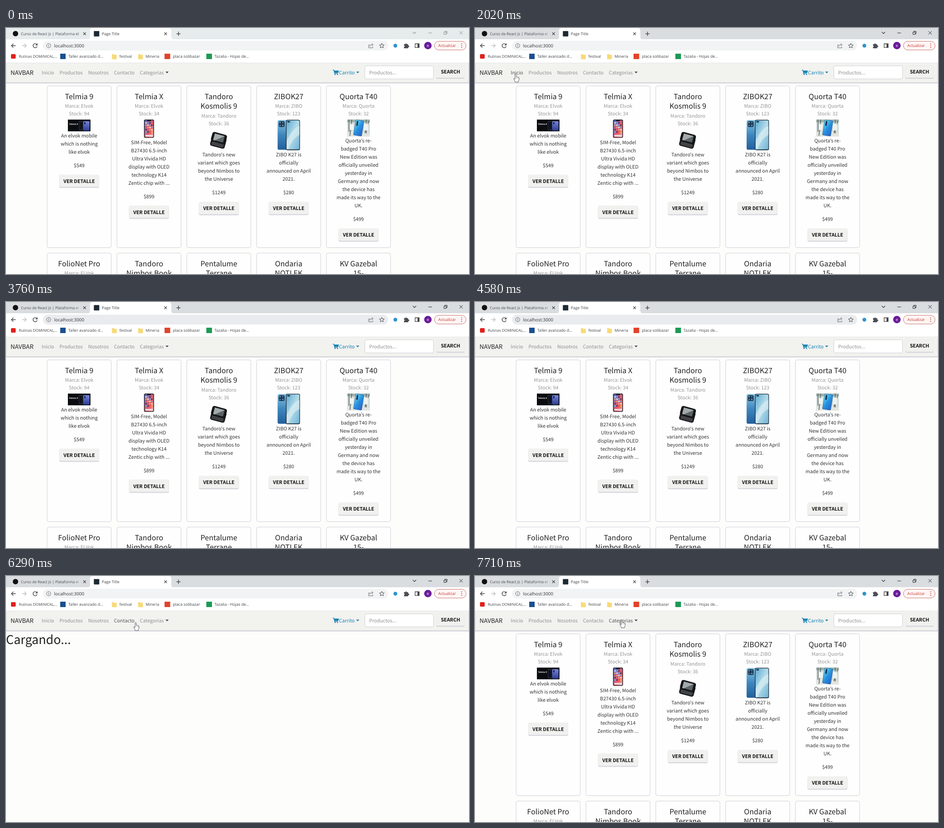
An HTML page that plays this animation: 1025 by 546 pixels, repeating every 8 s.

```html
<!DOCTYPE html>
<html lang="es">
<head>
<meta charset="utf-8">
<title>Page Title</title>
<style>
html, body { margin: 0; width: 100%; height: 100%; overflow: hidden; background: #fdfdfc; }
svg { display: block; width: 1025px; height: 546px; }
text { white-space: pre; text-rendering: geometricPrecision; }
.web { font-family: "Noto Sans CJK JP", "Noto Sans CJK SC", "Noto Sans CJK", sans-serif; }
.ui { font-family: "Open Sans", "Noto Sans", sans-serif; }
</style>
</head>
<body>
<svg id="stage" viewBox="0 0 1025 546" xmlns="http://www.w3.org/2000/svg"></svg>
<script>
const LOOP = 8000;
const RELOAD = 4620, LISTED = 6830, IMAGES = 7380, LAST_IMAGE = 7710;
const EM = 0.896; // the Latin glyphs of the CJK face are drawn larger than usual

// --- drawing helpers ---
const web = (x, y, s, size = 12, fill = '#333', more = '') =>
  `<text class="web" x="${x}" y="${y}" font-size="${size * EM}" fill="${fill}" ${more}>${s}</text>`;
const mid = (x, y, s, size, fill, more = '') =>
  web(x, y, s, size, fill, 'text-anchor="middle" ' + more);
const ui = (x, y, s, size = 8.7, fill = '#3c4043', more = '') =>
  `<text class="ui" x="${x}" y="${y}" font-size="${size}" fill="${fill}" ${more}>${s}</text>`;
const box = (x, y, w, h, fill, r = 0, more = '') =>
  `<rect x="${x}" y="${y}" width="${w}" height="${h}" rx="${r}" fill="${fill}" ${more}/>`;
const dot = (x, y, r, fill, more = '') =>
  `<circle cx="${x}" cy="${y}" r="${r}" fill="${fill}" ${more}/>`;
const line = (d, stroke, w = 1.2, more = '') =>
  `<path d="${d}" fill="none" stroke="${stroke}" stroke-width="${w}" ${more}/>`;
const shape = (d, fill, more = '') => `<path d="${d}" fill="${fill}" ${more}/>`;
const group = (id, body, more = '') => `<g id="${id}" ${more}>${body}</g>`;
const grad = (id, x2, y2, ...colors) =>
  `<linearGradient id="${id}" x2="${x2}" y2="${y2}">` + colors.map((c, i) =>
    `<stop offset="${i / (colors.length - 1)}" stop-color="${c}"/>`).join('') + '</linearGradient>';

function button(x, y, w, h, label) {
  return box(x, y + 1.5, w, h, '#cfcfd8', 3) +
    box(x, y, w, h - .5, '#f1f1f0', 3, 'stroke="#e6e6e6" stroke-width=".6"') +
    mid(x + w / 2, y + h / 2 + 4.2, label, 12, '#111', 'font-weight="700"');
}

// --- product pictures, around x = 0 from the top y = 0 ---
const pictures = [
  () => box(-25, 0, 50, 26, '#0b0c10') +
    ui(-22.5, 12, 'Telmia 9', 4.8, '#f4f4f6', 'font-weight="700"') +
    box(-1, 3.5, 10, 20, '#2a2f45', 1.5) + box(0, 5, 8, 17, '#10131f', 1) +
    box(9, 3.5, 14, 21, 'url(#navy)', 2) + box(11, 5.5, 3, 5, '#1b2148', 1),
  () => box(-11, 0, 22, 40.5, '#17171d', 3) + box(-9.6, 1.4, 19.2, 37.7, 'url(#candy)', 2.2) +
    box(-4.5, 1, 9, 2.4, '#17171d', 1.2) +
    [0, 1, 2, 3, 4].map(r => [0, 1, 2, 3].map(c =>
      box(-8 + c * 4.3, 6 + r * 5, 2.9, 2.9, ['#f6f6f8', '#f0545c', '#4db4ea', '#f5b34a', '#2d3350'][(r * 3 + c * 2) % 5], .8)
    ).join('')).join('') + box(-8, 34, 16, 3.6, '#e9dbe6', 1),
  () => '<g transform="translate(-.6 24) rotate(15) scale(.9)">' +
    box(-18, -9, 37, 27, '#1b1c1e', 5) + box(-15, 7, 31, 8.5, '#303234', 2) +
    [0, 1, 2].map(r => line(`M-13 ${8.6 + r * 2.6}H15`, '#85878a', .9, 'stroke-dasharray="1.5 1.3"')).join('') +
    box(-19, -17, 37, 23, '#141517', 5) + box(-13, -13.5, 25, 16.5, '#5d6468', 1) +
    shape('M-13 -13.5H12L-9 3H-13Z', '#a3aaac') + '</g>',
  () => box(-24.5, 1, 23, 66, 'url(#sea)', 3.5) + box(-22, 3.5, 13, 13, '#173753', 3) +
    dot(-19, 6.8, 1.8, '#7894ab') + dot(-13, 6.8, 1.8, '#60798f') +
    dot(-19, 13, 1.8, '#60798f') + dot(-13, 13, 1.8, '#7894ab') +
    box(-6, .5, 31, 67.5, '#16212f', 3.5) + box(-4.8, 1.7, 28.6, 64.5, 'url(#sky)', 2.6) +
    shape('M-4.8 48Q8 20 23.8 14V34Q8 42 -1 66H-4.8Z', '#e3f2f5', 'opacity=".6"') +
    box(-3, 3.5, 6, 2.8, '#16212f', 1.4),
  () => box(-25, 0, 50, 37.5, '#d3dcdb') + box(-25, 0, 50, 6, '#9fb0ac') +
    shape('M-25 29L-9 23L25 31V37.5H-25Z', '#e4e5df') +
    line('M-21 0V27M-15 0L-19 36M17 0V31M23 3L14 30', '#53635f', 1.5) +
    box(-19, 10, 8, 13, '#f0f4f1') + box(12, 9, 9, 15, '#eef2f0') +
    '<g transform="translate(0 18) rotate(9)">' + box(-9, -17, 19, 35, '#1c62a8', 2.5) +
    box(-8.2, -16.2, 17.4, 33.4, 'url(#aqua)', 2) + box(-6, -14.5, 3.4, 11, '#143150', 1.5) + '</g>'
];
const heights = [26, 40.8, 47, 68.5, 37.5];

// --- products: title, brand, stock, text, price ---
const rows = [[
  ['Telmia 9', 'Elvok', 94, 'An elvok mobile|which is nothing|like elvok', 549],
  ['Telmia X', 'Elvok', 34, 'SIM-Free, Model|B27430 6.5-inch|Ultra Vivida HD|display with OLED|technology K14|Zentic chip with ...', 899],
  ['Tandoro|Kosmolis 9', 'Tandoro', 36, 'Tandoro\'s new|variant which goes|beyond Nimbos to|the Universe', 1249],
  ['ZIBOK27', 'ZIBO', 123, 'ZIBO K27 is|officially|announced on April|2021.', 280],
  ['Quorta T40', 'Quorta', 32, 'Quorta’s re-|badged T40 Pro|New Edition was|officially unveiled|yesterday in|Germany and now|the device has|made its way to the|UK.', 499]
], [
  ['FolioNet Pro', 'ELVok', 83],
  ['Tandoro|Nimbos Book', 'Tandoro', 50],
  ['Pentalume|Terrane|Laptop 4', 'Pentalume', 68],
  ['Ondaria|NOTLEK', 'Ondaria', 96],
  ['KV Gazebal|15-|RT2048LN', 'KV Gazebal', 89]
]];

function card(item, col, top, height, loaded) {
  const [title, brand, stock, text, price] = item;
  const x = 162 + col * 154.6;
  let out = box(x - 71, top, 142, height, '#fefefe', 4, 'stroke="#cfcfd8" stroke-width="1"');
  let y = top + 29.3;
  title.split('|').forEach((s, i) => {
    if (i) y += 21.6;
    out += mid(x, y, s, 18, '#222');
  });
  out += mid(x, y + 19.2, 'Marca: ' + brand, 12, '#969696') +
    mid(x, y + 36.4, 'Stock: ' + stock, 12, '#969696');
  if (!text) return out;
  y += 45.5;
  if (loaded) {
    const clip = col === 3 ? 'clip-path="url(#partial)"' : '';
    out += `<g ${clip}><g transform="translate(${x} ${y})">${pictures[col]()}</g></g>`;
  }
  y += (loaded ? heights[col] : 18) - 4.5;
  for (const s of text.split('|')) out += mid(x, y += 18, s, 12, '#333');
  y += 30;
  return out + mid(x, y, '$' + price, 12, '#333') + button(x - 44, y + 17, 88, 27.5, 'VER DETALLE');
}

function grid(loaded) {
  const h = loaded ? 359 : 339.3;
  return rows[0].map((p, i) => card(p, i, 128.5, h, loaded)).join('') +
    rows[1].map((p, i) => card(p, i, 140.5 + h, 359, loaded)).join('');
}

// --- navbar ---
const links = [['Inicio', 79, 106], ['Productos', 118.5, 170], ['Nosotros', 182, 227],
  ['Contacto', 239, 285], ['Categorias', 296.3, 350]];
const caret = (x, fill) => shape(`M${x} 96.8h7.2l-3.6 3.8z`, fill);

function navbar() {
  return box(0, 121, 1025, 2, '#cfcfdb') +
    box(.5, 77, 1024, 44, '#f2f2ef', 0, 'stroke="#dcdcdc"') +
    web(10, 103.6, 'NAVBAR', 15, '#222') +
    links.map(([s, x], i) => web(x, 102.8, s, 12, '#8f8f8f', `id="link${i}"`)).join('') +
    caret(353, '#444') +
    line('M723.5 93.5h2.3l1.8 7.6h7', '#1482b4', 1.3) +
    shape('M726 94.5h11l-1.5 5.3h-8.2z', '#1482b4') +
    dot(728.5, 103, 1.3, '#1482b4') + dot(734, 103, 1.3, '#1482b4') +
    web(737.2, 102.8, 'Carrito', 12, '#1482b4') + caret(775, '#1482b4') +
    box(794.5, 84, 152, 29, '#fff', 3.5, 'stroke="#cfcfd4"') +
    web(804, 102.8, 'Productos...', 12, '#8f8f8f') +
    button(953, 83.5, 62, 27.5, 'SEARCH');
}

// --- browser frame ---
const cross = (x, y, r, color, w) =>
  line(`M${x - r} ${y - r}l${2 * r} ${2 * r}M${x + r} ${y - r}l${-2 * r} ${2 * r}`, color, w);
const folder = x => shape(`M${x} 58h4l1.4 1.6h5.2v9.6h-10.6z`, '#f8d978');

function browser() {
  const ink = '#5f6368';
  return box(0, 0, 1025, 26, '#dee1e6', 0, 'id="strip"') +
    dot(21, 12.6, 6, '#111') +
    ui(33, 15.8, 'Curso de React Js | Plataforma el', 8.4, '#45494d', 'clip-path="url(#tabtext)"') +
    box(150, 6, 13, 13, 'url(#fade)', 0, 'id="tabfade" opacity=".6"') +
    cross(174, 12.8, 2.9, '#333', 1.2) +
    shape('M180 25.5Q186 25.5 186 19V6Q186 0 192 0H360Q366 0 366 6V19Q366 25.5 372 25.5Z', '#fff') +
    box(194.5, 6.8, 12, 12, '#1d2a33', 1) +
    ui(212, 15.8, 'Page Title', 8.7) + cross(353.3, 12.8, 2.9, '#333', 1.2) +
    line('M377.3 12.8h9M381.8 8.3v9', '#333', 1.3) +
    group('controls', line('M900.5 8.6l3.8 3.8 3.8-3.8', 'currentColor', 1.1) +
      line('M935 11h8', 'currentColor', 1) +
      line('M969.5 9.2h5v5h-5zM971.3 9v-1.8h5.2v5.2h-1.8', 'currentColor', 1) +
      cross(1007.5, 10.7, 3.6, 'currentColor', 1)) +
    box(0, 25, 1025, 52, '#fff') +
    dot(64.5, 39.2, 13, '#e8eaed', 'id="reloadHover"') +
    line('M21.5 39.2H12M16.4 34.8l-4.4 4.4 4.4 4.4', '#444', 1.4) +
    line('M35.5 39.2H45M40.6 34.8l4.4 4.4-4.4 4.4', '#bfc1c4', 1.4) +
    line('M68.4 36.6A4.6 4.6 0 1 0 69 40.6', '#444', 1.4) + shape('M69.8 33.8v4.6h-4.6z', '#444') +
    box(82, 28.3, 764, 21.8, '#f1f3f4', 10.9, 'id="omnibox"') +
    dot(94.5, 39.2, 4.6, 'none', `stroke="${ink}"`) + line('M94.5 38.6v3M94.5 36.4v1.1', ink, 1.1) +
    ui(106.5, 42.8, 'localhost:3000', 9.9, '#303134') +
    line('M806 37.6h-3v6.4h9v-2.6M805.6 41q.6-4 6-4M809.6 34.2l3.2 2.8-3.2 2.8', ink, 1) +
    line('M832 34l1.5 3.5 3.8.3-2.9 2.5.9 3.7-3.3-2-3.3 2 .9-3.7-2.9-2.5 3.8-.3z', '#444', 1) +
    dot(862, 39.2, 4.2, '#2d93cf') +
    shape('M881 36h3a1.7 1.7 0 1 1 3.4 0h3v3a1.8 1.8 0 1 1 0 3.4v2.6h-9.4v-3a1.6 1.6 0 1 0 0-3.2z', '#4a4d51') +
    line('M905.7 35h9v8.4h-9z', '#444', 1.3) + box(911, 35, 4, 8.4, '#444') +
    dot(934, 39, 8.3, '#6a1b9a') + ui(934, 42, 'e', 8.8, '#fff', 'text-anchor="middle"') +
    box(948.5, 29.5, 70, 19.3, '#fdf6f5', 9.6, 'stroke="#c9716c"') +
    ui(957, 42.2, 'Actualizar', 8.5, '#c5302a') +
    [35.2, 39.2, 43.2].map(y => dot(1008.8, y, 1, '#c5302a')).join('') +
    box(11, 58, 10.5, 10, '#e0201b', 2) + ui(28.5, 66.2, 'Rutinas DOMINICAL,...', 8.3) +
    box(120, 57, 12, 12, '#1b4f8f') + ui(138, 66.2, 'Taller avanzado d...', 8.7) +
    folder(234.5) + ui(251, 66.2, 'festival', 8.5) +
    folder(292.5) + ui(309, 66.2, 'Mineria', 8.5) +
    box(351, 57, 12.5, 12, '#e2432a') + ui(369.5, 66.2, 'placa solibazar', 8.7) +
    box(443.5, 57, 12.5, 12, '#1c9a55') + ui(461.5, 66.2, 'Tazalia - Hojas de...', 8.7);
}

// --- pointers, tip at 0,0 ---
const arrow = shape('M0 0V12.2L2.8 9.6 4.7 13.9 6.5 13.1 4.7 8.9H8.5Z', '#fff',
  'stroke="#4a4a55" stroke-width=".8"');
const hand = shape('M-1.3 1Q0-.8 1.3 1V6.2Q2.6 5.2 3.6 6.7 5 6 5.7 7.5 7.3 7 7.4 9V12.5Q7.3 14.5 6 16V18H-1.2V16.5L-4 11.5Q-4.8 9.5-3.2 9.5L-1.3 11.5Z',
  '#fff', 'stroke="#44444e" stroke-width=".9"') + line('M1.4 6v4M3.6 7v3.2M5.7 8v2.6', '#8a8a92', .6);

const stage = document.getElementById('stage');
stage.innerHTML = '<defs>' +
  grad('navy', 0, 1, '#7484dc', '#2c3c90') +
  grad('candy', 1, 1, '#3f79c9', '#b45f9a', '#ee5c56', '#f2b9c0') +
  grad('sea', 0, 1, '#86c4e2', '#3f86bd', '#235f9c') +
  grad('sky', 1, 1, '#5fa9cf', '#b4dcea', '#6fb3d4') +
  grad('aqua', 1, 1, '#6fe0f2', '#2592e0', '#2f62c4') +
  '<linearGradient id="fade"><stop offset="0" stop-color="#dee1e6" stop-opacity="0"/><stop offset="1" stop-color="#dee1e6"/></linearGradient>' +
  '<clipPath id="tabtext"><rect x="30" y="0" width="132" height="25"/></clipPath>' +
  '<clipPath id="partial"><rect id="partialBox" x="555" y="203" width="142" height="70"/></clipPath></defs>' +
  box(0, 0, 1025, 546, '#fdfdfc') +
  group('full', grid(true)) + group('bare', grid(false)) +
  group('loading', web(0, 151, 'Cargando...', 30, '#222')) +
  navbar() + browser() +
  group('arrow', arrow) + group('hand', hand);

const $ = id => document.getElementById(id);
const parts = {};
for (const id of ['full', 'bare', 'loading', 'arrow', 'hand', 'strip', 'controls', 'reloadHover', 'omnibox', 'partialBox', 'tabfade'])
  parts[id] = $(id);
const linkNodes = links.map((_, i) => $('link' + i));

// --- pointer path: time, x, y ---
const path = [
  [950, 958, 4], [1060, 700, 190], [1160, 300, 295], [1220, 130, 230], [1280, 66, 159],
  [1490, 50, 117], [1710, 50, 117], [2020, 90, 102], [2840, 90, 102], [3000, 84, 66],
  [3110, 96, 44], [3260, 130, 37], [3760, 130, 37], [3900, 70, 40], [4250, 62, 44],
  [4400, 66, 38], [4550, 112, 44], [5350, 112, 47], [5410, 165, 74], [5500, 325, 99],
  [5660, 325, 99], [5780, 300, 111], [5880, 290, 108], [6100, 290, 108], [6270, 287, 103],
  [7000, 287, 103], [7300, 319, 99], [7550, 325, 97]
];

function pointerAt(t) {
  let i = 0;
  while (i < path.length - 1 && path[i + 1][0] <= t) i++;
  const a = path[i], b = path[i + 1] || a;
  const k = b === a ? 0 : Math.max(0, (t - a[0]) / (b[0] - a[0]));
  return [a[1] + (b[1] - a[1]) * k, a[2] + (b[2] - a[2]) * k];
}

const mix = (a, b, k) => `rgb(${a.map((v, i) => Math.round(v + (b[i] - v) * k))})`;
const show = (node, on) => node.setAttribute('display', on ? 'inline' : 'none');

function draw(t) {
  const focus = t < 550 ? 0 : Math.min(1, (Math.floor((t - 550) / 60) + 1) / 5);
  parts.strip.setAttribute('fill', mix([230, 235, 236], [218, 221, 224], focus));
  parts.controls.setAttribute('color', mix([140, 143, 146], [32, 33, 36], focus));
  parts.tabfade.setAttribute('opacity', .6 * focus);

  const listed = t < RELOAD || t >= LISTED;
  const loaded = t < RELOAD || t >= IMAGES;
  show(parts.full, loaded);
  show(parts.bare, listed && !loaded);
  show(parts.loading, !listed);
  parts.partialBox.setAttribute('height', t >= IMAGES && t < LAST_IMAGE ? 48 : 70);

  // over the address bar the thin text pointer does not show
  const [x, y] = pointerAt(t);
  const on = t >= 950;
  const inBar = on && x > 82 && x < 846 && y > 28 && y < 50;
  const over = on && y > 87 && y < 112 ? links.findIndex(l => x >= l[1] - 6 && x <= l[2] + 6) : -1;
  linkNodes.forEach((n, i) => n.setAttribute('fill', i === over ? '#555' : '#8f8f8f'));
  parts.omnibox.setAttribute('fill', inBar ? '#e9ebee' : '#f1f3f4');
  show(parts.reloadHover, on && Math.hypot(x - 64.5, y - 39.2) < 13);
  show(parts.arrow, on && !inBar && over < 0);
  show(parts.hand, over >= 0);
  const at = `translate(${x.toFixed(1)} ${y.toFixed(1)})`;
  parts.arrow.setAttribute('transform', at);
  parts.hand.setAttribute('transform', at);
}

const start = performance.now();
function tick() {
  draw((performance.now() - start) % LOOP);
  requestAnimationFrame(tick);
}
draw(0);
requestAnimationFrame(tick);
</script>
</body>
</html>
```
